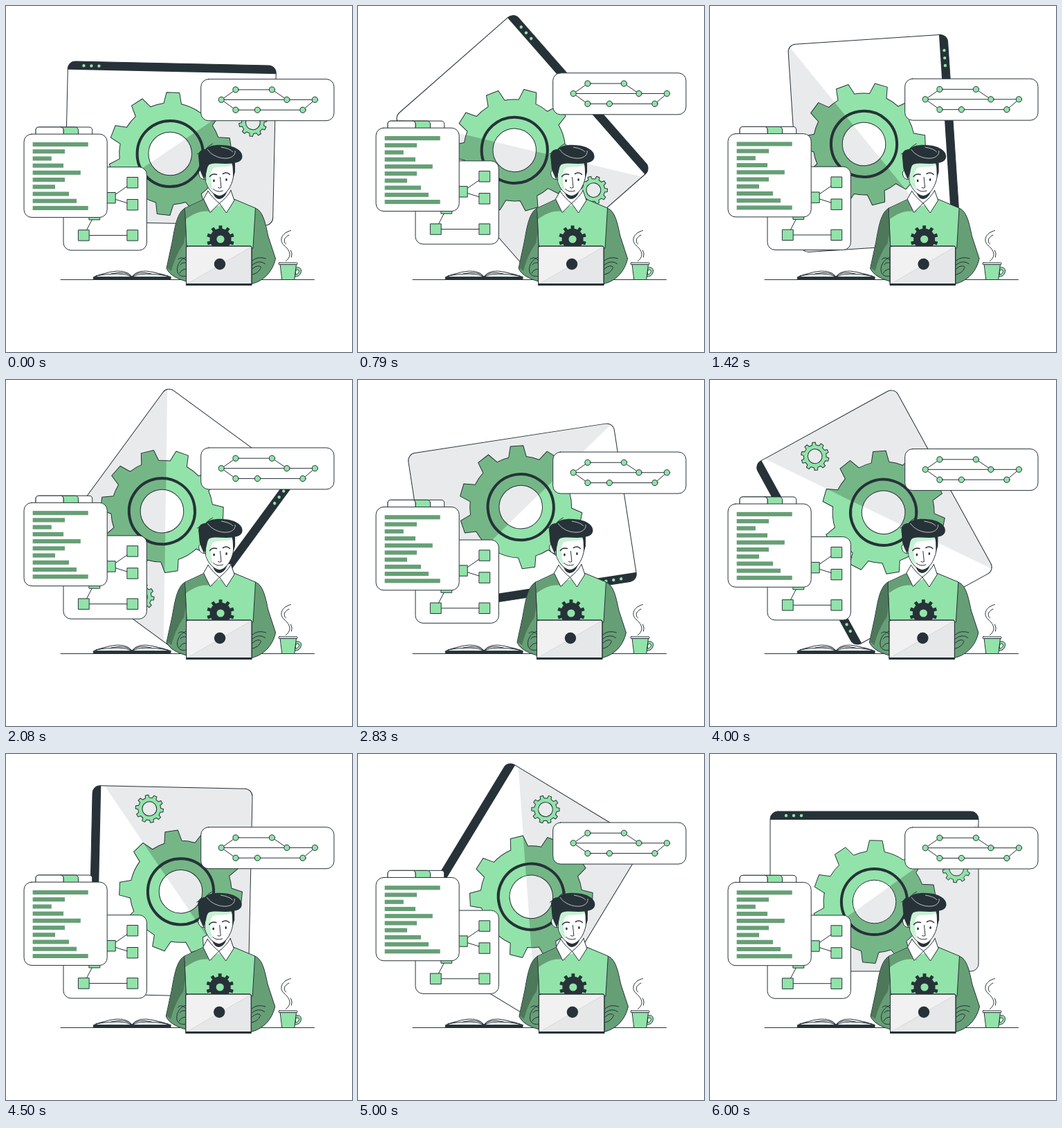
These frames come from a looping animation (500 px wide and 500 px high, 6040 ms). An HTML page:

```html
<!DOCTYPE html>
<html lang="en">
<head>
<meta charset="utf-8">
<title>Developer at work</title>
<style>
  html, body { margin: 0; width: 100%; height: 100%; overflow: hidden; background: #fff; }
  svg { display: block; width: 100vw; height: 100vh; }
  .ink { stroke: #263238; stroke-width: 1; stroke-linecap: round; stroke-linejoin: round; }
  .line { fill: none; }
  .white { fill: #fff; }
  .green { fill: #92e3a9; }
  .mid { fill: #669f76; }
  .deep { fill: #4d7859; }
  .shade { fill: #75b687; }
  .pale { fill: #c8f1d4; }
  .grey { fill: #e9eaeb; }
  .dark { fill: #263238; }
</style>
</head>
<body>
<svg viewBox="0 0 500 500">
  <defs>
    <clipPath id="half"><path d="M150.5-98.5V115.5H-150.5Z"/></clipPath>
    <clipPath id="frame"><rect x="-150.5" y="-115.5" width="301" height="231" rx="11"/></clipPath>
  </defs>

  <g id="window">
    <g clip-path="url(#frame)">
      <path class="white" d="M-151-116H151V116H-151Z"/>
      <path class="grey" d="M151-98.5V116H-151Z"/>
      <path class="dark" d="M-151-116H151V-103.5H-151Z"/>
    </g>
    <rect class="ink line" x="-150.5" y="-115.5" width="301" height="231" rx="11"/>
    <g class="green">
      <circle cx="-127.5" cy="-109.5" r="2.2"/>
      <circle cx="-116.5" cy="-109.5" r="2.2"/>
      <circle cx="-105.5" cy="-109.5" r="2.2"/>
    </g>
    <path class="green bigGear" fill-rule="evenodd"/>
    <g clip-path="url(#half)"><path class="shade bigGear" fill-rule="evenodd"/></g>
    <path class="ink line bigGear"/>
    <circle cx="0" cy="15" r="47.6" fill="none" stroke="#263238" stroke-width="4"/>
    <path id="smallGear" class="ink green" fill-rule="evenodd"/>
  </g>

  <path class="ink line" d="M79 395.5H445.5"/>

  <g id="book">
    <path class="ink white" d="M127 391.5L139 387.5Q166 380 182 391.5Q198 380 225 387.5L238 391.5Z"/>
    <path class="ink white" d="M130 390L150 384.5Q173 379.5 182 391Q191 379.5 212 384.5L235 390.5Q196 383.5 182 391.5Q168 383.5 130 390Z"/>
    <path class="ink line" d="M152 387Q174 382 182 391.5Q190 382 210 387"/>
    <path class="dark" d="M126 391.8H238.5V395.6H126Z"/>
  </g>

  <g id="cup">
    <path class="ink green" fill-rule="evenodd" d="M418 378.5C424 376.5 427 379 426.5 383.5C426 388.5 422 391.5 417 391ZM419 381.5L418.3 388C421 388 423.2 386 423.5 383.2C423.6 381 421.5 380.7 419 381.5Z"/>
    <path class="ink green" d="M396.5 373.5H419.5L416.8 395.5H399.2Z"/>
    <rect class="ink white" x="394" y="371" width="27" height="2.6" rx="1"/>
    <path class="ink line" d="M411.5 324.5C398 328 394 339 402 346C410 353 414 361 404.5 368.5"/>
    <path class="ink line" d="M409 331C402 334 400 340 404.500 344M411.500 353Q414.500 358 412.500 363"/>
  </g>

  <g id="cards">
    <rect class="ink white" x="83" y="233" width="120.4" height="120.300" rx="11"/>
    <path class="ink line" d="M183 255.500L151 277.500L183 287.500M128 302L112.500 331.700H183"/>
    <g id="squares" class="ink green"></g>

    <path class="ink white" d="M43 190V180Q43 175.300 47.700 175.300H120Q124.700 175.300 124.700 180V190Z"/>
    <path class="ink green" d="M83 187V180Q83 175.300 78 175.300H99.500Q104.500 175.300 104.500 180V187Z"/>
    <path class="ink white" d="M43 187V180Q43 175.300 47.700 175.300H78.500Q83 175.300 83 180V187Z"/>
    <rect class="ink white" x="26" y="185.400" width="120.200" height="120.300" rx="11"/>
    <g id="rows" class="mid"></g>

    <rect class="ink white" x="281.700" y="106" width="192.300" height="60" rx="11"/>
    <path class="ink line" d="M446.500 135.700H311.300L332 121.200H384.500L406 135.700M311.300 135.700L332 150.500H429L446.500 135.700"/>
    <g id="nodes" class="ink green"></g>
  </g>

  <g id="person">
    <!-- sleeves and torso -->
    <path class="ink mid" d="M259 292C247 298 244 320 240 342L232 379C236 388 246 394 261 398V345Z"/>
    <path class="deep" d="M258.500 292.500C247.500 299 244.500 320 240.500 342L232.500 378L239 383C243 367 250 352 257 343L260.500 322Z"/>
    <path class="ink mid" d="M360 292C372 296 375 315 379 333L389.500 365C386 382 374 397 355 401.500V345Z"/>
    <path class="ink green" d="M259 292L289 278H327L360.500 292L357 350H261.500Z"/>
    <path class="mid" d="M259.500 292.300L288 279L299 298C283 293 270 301 260 308Z"/>
    <path id="emblem" class="dark" fill-rule="evenodd"/>

    <!-- neck and collar -->
    <path class="white" d="M292 266H326L319 292L309 288L297 292Z"/>
    <path class="dark" d="M298 267L320 266C318 274 313 279 308 279C304 279 300 275 298 267Z"/>
    <path class="ink white" d="M292 267.500L285.500 279L295 298.500L308.500 285C303 281 297 275 292 267.500Z"/>
    <path class="ink white" d="M325 266.500L330 281L318.500 299L308.500 285C315 280 321 274 325 266.500Z"/>

    <!-- head -->
    <path class="ink white" d="M288 239C282 235 277 238 279 244C280 249 285 252 289 250Z"/>
    <path class="pale" d="M288 240C284 237 280 240 281 244C282 247 285 249 288 249Z"/>
    <path class="ink white" d="M288.500 224V253C291 265 302 274.500 308.500 274.500C317 274 326 262 328.500 247L330.500 222Z"/>
    <path class="pale" d="M289 226H328L327 230C318 234 304 231 299 235C294 241 296 253 299 267C293 262 289.500 257 289 253Z"/>
    <path class="dark" d="M278.500 221C276.500 212 281 207 288 207C293 201 307 199.500 319 201.500C332 203 342 210 341.500 217.500C341.500 223 336 226 331 226.500L331 240L328.500 248C327.500 240 328.500 233 326.500 227.500C315 229 302 226 294 229C289.500 233 291 239 288.500 244L286.500 251C283 243 280 238 279.500 233Z"/>
    <path class="ink line" d="M276.500 214Q281 210 287 210M288 208Q292 202 298.500 199"/>
    <path fill="none" stroke="#fff" stroke-width=".7" d="M291 207C297 216 309 221 320 220C328 219 332 214 331 209M311 204Q324 206 328 211"/>
    <path class="ink line" stroke-linecap="round" d="M294.500 246.500Q298 241.500 304.500 243.500M313.500 242.500Q319 239 323.500 243.500" style="stroke-width:1.500"/>
    <ellipse class="dark" cx="300.500" cy="252.500" rx="1.300" ry="2"/>
    <ellipse class="dark" cx="318.500" cy="251" rx="1.300" ry="2"/>
    <path class="ink line" d="M309.500 247.500L311 262.500Q308.500 263.800 306.500 262.500M299.500 264.500Q305 270 313.500 267"/>

    <!-- hands -->
    <path class="ink mid" d="M261 363C253 365 247 373 247.500 382C248 389 254 392 261 390Z"/>
    <path class="ink line" d="M249 366Q254 361 260 367M252 374Q254 370 260 371M251 386Q253 381 260 380"/>
    <path class="ink line" d="M356 368Q364 361 375.500 365M356 374Q366 366 374.500 372.500M356 380Q365 372 369 378M356 388Q365 386 368 379"/>

    <!-- laptop -->
    <rect class="ink" fill="#f1f1f2" x="260.500" y="347" width="94.500" height="56" rx="2"/>
    <path fill="#e6e7e8" d="M354.500 348V402H261Z"/>
    <path fill="none" stroke="#c9cbcd" stroke-width=".6" d="M354.500 348L261 402"/>
    <rect class="ink line" x="260.500" y="347" width="94.500" height="56" rx="2"/>
    <path class="dark" d="M260 401H355.500V404H260Z"/>
    <circle class="dark" cx="309" cy="373" r="8.200"/>
  </g>
</svg>

<script>
const $ = id => document.getElementById(id);

// Toothed wheel outline with a round hole; angles and half-widths in degrees.
function gear(cx, cy, angles, outer, inner, hole, tip, root) {
  const at = (r, deg) => {
    const a = deg * Math.PI / 180;
    return (cx + r * Math.cos(a)).toFixed(2) + ' ' + (cy + r * Math.sin(a)).toFixed(2);
  };
  const teeth = angles.map((a, i) =>
    (i ? `A${inner} ${inner} 0 0 1 ` : 'M') + at(inner, a - root) +
    'L' + at(outer, a - tip) + 'L' + at(outer, a + tip) + 'L' + at(inner, a + root));
  return teeth.join('') + `A${inner} ${inner} 0 0 1 ${at(inner, angles[0] - root)}Z` +
    `M${cx - hole} ${cy}a${hole} ${hole} 0 1 0 ${2 * hole} 0a${hole} ${hole} 0 1 0 ${-2 * hole} 0Z`;
}

const even = (n, start) => Array.from({ length: n }, (_, i) => start + i * 360 / n);
const bigTeeth = [-160, -124, -88.5, -45, -10, 25, 61, 95, 130, 163];
const bigPath = gear(0, 15, bigTeeth, 89, 73.5, 31.3, 6, 10);
document.querySelectorAll('.bigGear').forEach(p => p.setAttribute('d', bigPath));
$('smallGear').setAttribute('d', gear(118.6, -32.8, even(10, -12), 20.2, 16.3, 10.4, 6.5, 10));
$('emblem').setAttribute('d', gear(310, 337, even(10, -90), 20, 15.5, 5.6, 7, 9));

const ends = [118.7, 85, 65.8, 83, 107.8, 85, 71, 91, 102, 118.7];
$('rows').innerHTML = ends.map((x, i) =>
  `<rect x="38.600" y="${197.2 + i * 10.22}" width="${x - 38.6}" height="6.100"/>`).join('');

const boxes = [[183, 255.5], [183, 287.5], [150.5, 277.5], [128, 301.5], [112.5, 331.7], [183, 331.7]];
$('squares').innerHTML = boxes.map(([x, y]) =>
  `<rect x="${x - 7.7}" y="${y - 7.7}" width="15.400" height="15.400"/>`).join('');

const dots = [[311.3, 135.7], [332, 121.2], [384.5, 121.2], [406, 135.7],
              [446.5, 135.7], [429, 150.5], [363.5, 150.5], [332, 150.5]];
$('nodes').innerHTML = dots.map(([x, y]) => `<circle cx="${x}" cy="${y}" r="4.100"/>`).join('');

const LOOP = 6040, CYCLE = 6000, STEP = 125 / 3;
// Sideways shake of the person, one stop per tenth of the cycle.
const shake = [0, -1, 2, -4, 4, -4, 4, -4, 2, -1, 0];

function shakeAt(p) {
  const i = Math.min(9, Math.floor(p * 10));
  return shake[i] + (shake[i + 1] - shake[i]) * (p * 10 - i);
}

function draw(now) {
  const t = now % LOOP;
  const u = Math.min(CYCLE, (Math.floor((t + 5) / STEP) + 0.5) * STEP); // 24 poses per second
  const p = u / CYCLE;
  const f = u % 1500 / 1500;
  const lift = -10 * (1 - Math.abs(1 - 2 * f));
  $('window').setAttribute('transform', `translate(237.5 198.5) rotate(${360 * p})`);
  $('cards').setAttribute('transform', `translate(0 ${lift})`);
  $('person').setAttribute('transform', `translate(${shakeAt(p)} 0)`);
}

function tick() {
  draw(performance.now());
  requestAnimationFrame(tick);
}
tick();
</script>
</body>
</html>
```
